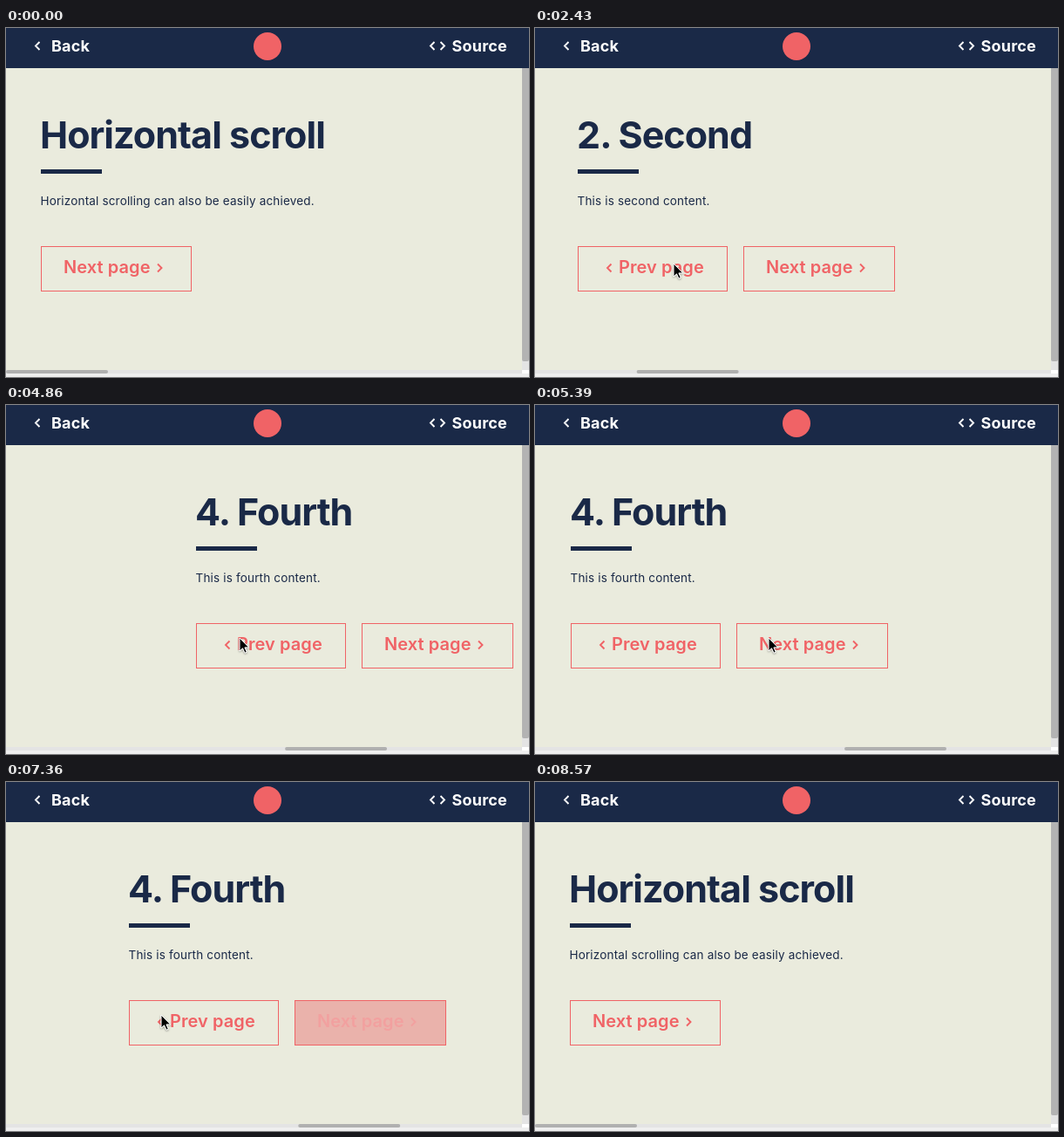
An HTML page for the animation above (9.44 s loop, 600 by 400 pixels).

```html
<!DOCTYPE html>
<html lang="en">
<head>
<meta charset="utf-8">
<title>Horizontal scroll</title>
<style>
  html, body { margin: 0; width: 100%; height: 100%; overflow: hidden; background: #eaebdd; }
  svg { display: block; font-family: Inter, "Open Sans", sans-serif; fill: #1a2947; }
  .title { font-size: 43px; font-weight: 700; letter-spacing: -.95px; }
  .body { font-size: 13.5px; letter-spacing: .17px; }
  .label { font-size: 20px; font-weight: 600; letter-spacing: .08px; fill: currentColor; }
  .nav { font-size: 18px; font-weight: 700; letter-spacing: .2px; fill: #fff; }
  .icon { fill: none; stroke: currentColor; stroke-width: 1.9; }
  .button { color: #f06366; }
  .frame { fill: none; stroke: #f06366; }
  .glow { fill: #ea6e71; opacity: 0; }
</style>
</head>
<body>
<svg width="600" height="400" viewBox="0 0 600 400">
  <defs>
    <filter id="soft" x="-50%" y="-50%" width="200%" height="200%">
      <feDropShadow dx="0" dy="1" stdDeviation=".8" flood-opacity=".4"/>
    </filter>
  </defs>
  <rect width="600" height="400" fill="#eaebdd"/>
  <g id="pages"></g>

  <rect width="600" height="46" fill="#1a2947"/>
  <g color="#fff">
    <path class="icon" d="M38.5 16l-4.5 4.5 4.5 4.5M491.5 16l-4.5 4.5 4.5 4.5M498.5 16l4.5 4.5-4.5 4.5"/>
    <text class="nav" x="52" y="27">Back</text>
    <text class="nav" x="511.5" y="27">Source</text>
  </g>
  <circle cx="300" cy="21" r="16" fill="#f06366"/>

  <rect x="592" y="46" width="8" height="346" fill="#e4e4e4"/>
  <path d="M592 46h8v334q0 2-2 2h-4q-2 0-2-2z" fill="#b3b3b3"/>
  <rect y="392" width="592" height="4" fill="#e4e4e4"/>
  <rect x="592" y="392" width="8" height="4" fill="#fff"/>
  <rect y="396" width="600" height="4" fill="#efefef"/>
  <rect id="thumb" y="392" width="117" height="4" rx="2" fill="#b0b0b0"/>

  <path id="cursor" d="M0 0V15L3.5 11.8 6 17.2 8.3 16.2 5.9 10.9H10.7Z"
        fill="#000" stroke="#fff" filter="url(#soft)"/>
</svg>

<script>
const LOOP = 9440, PAGE = 600;
const $ = id => document.getElementById(id);

// Each click: first visible change, start of the scroll, target position
const clicks = [
  [1830, 1863, 600], [3370, 3408, 1200], [4670, 4645, 1800],
  [5710, 5702, 2400], [7310, 7294.3, 0]
];

// Pointer stops: time, x, y
const stops = [
  [720, 343, 398], [1620, 159, 270], [2820, 159, 270], [3220, 271, 271],
  [4130, 271, 271], [4220, 268, 267], [6330, 268, 267], [7130, 178, 267],
  [8310, 178, 267], [8570, 190, 400]
];

const clamp = u => Math.min(1, Math.max(0, u));
const lerp = (a, b, u) => a + (b - a) * u;
const smooth = u => u * u * (3 - 2 * u);
const outQuint = u => 1 - (1 - u) ** 5;

function button(x, width, label, back, main) {
  const tip = back ? 'M38.5 270.5l-4.5 4.5 4.5 4.5' : 'M134 270.5l4.5 4.5-4.5 4.5';
  return `<g class="button${main ? ' main' : ''}" transform="translate(${x})">
    <rect class="glow" y="250" width="${width}" height="52"/>
    <rect class="frame" x=".5" y="250.5" width="${width - 1}" height="51"/>
    <path class="icon" d="${tip}"/>
    <text class="label" x="${back ? 47 : 26}" y="281">${label}</text></g>`;
}

function page(name, i) {
  const title = i ? `${i + 1}. ${name}` : 'Horizontal scroll';
  const body = i ? `This is ${name.toLowerCase()} content.`
                 : 'Horizontal scrolling can also be easily achieved.';
  const buttons = i === 0 ? button(0, 173, 'Next page', false, true)
    : i === 4 ? button(0, 172, 'First page', true, true)
    : button(0, 172, 'Prev page', true) + button(190, 174, 'Next page', false, true);
  return `<g transform="translate(${40 + i * PAGE})">
    <text class="title" x="-1" y="138">${title}</text>
    <rect y="162" width="70" height="5"/>
    <text class="body" x="-.5" y="203">${body}</text>${buttons}</g>`;
}

$('pages').innerHTML = ['First', 'Second', 'Third', 'Fourth', 'Fifth'].map(page).join('');
const mains = [...document.querySelectorAll('.main')];

function scrollAt(t) {
  let from = 0;
  for (const [shown, start, to] of clicks) {
    if (t < shown) break;
    from = lerp(from, to, outQuint(clamp((t - start) / 1000)));
  }
  return Math.round(from);
}

// The last clicked button stays filled until the next click
function glowAt(t, i) {
  const fade = click => click ? 1 - (1 - clamp((t - click[0]) / 160)) ** 2 : 0;
  return fade(clicks[i]) - fade(clicks[i + 1]);
}

function pointerAt(t) {
  const next = stops.findIndex(s => t < s[0]);
  if (next < 1) return null;
  const [t0, x0, y0] = stops[next - 1], [t1, x1, y1] = stops[next];
  const u = smooth((t - t0) / (t1 - t0));
  return [lerp(x0, x1, u), lerp(y0, y1, u)];
}

function draw(t) {
  const scroll = scrollAt(t);
  $('pages').setAttribute('transform', `translate(${-scroll})`);
  $('thumb').setAttribute('x', scroll * 592 / (5 * PAGE));

  mains.forEach((el, i) => {
    const glow = glowAt(t, i);
    el.querySelector('.glow').style.opacity = glow;
    el.style.color = `rgb(${lerp(240, 245, glow)},${lerp(99, 230, glow)},${lerp(102, 224, glow)})`;
  });

  const point = pointerAt(t);
  $('cursor').style.display = point ? '' : 'none';
  if (point) $('cursor').setAttribute('transform', `translate(${point})`);
}

const begin = performance.now();
function tick() {
  draw((performance.now() - begin) % LOOP);
  requestAnimationFrame(tick);
}
tick();
</script>
</body>
</html>
```
